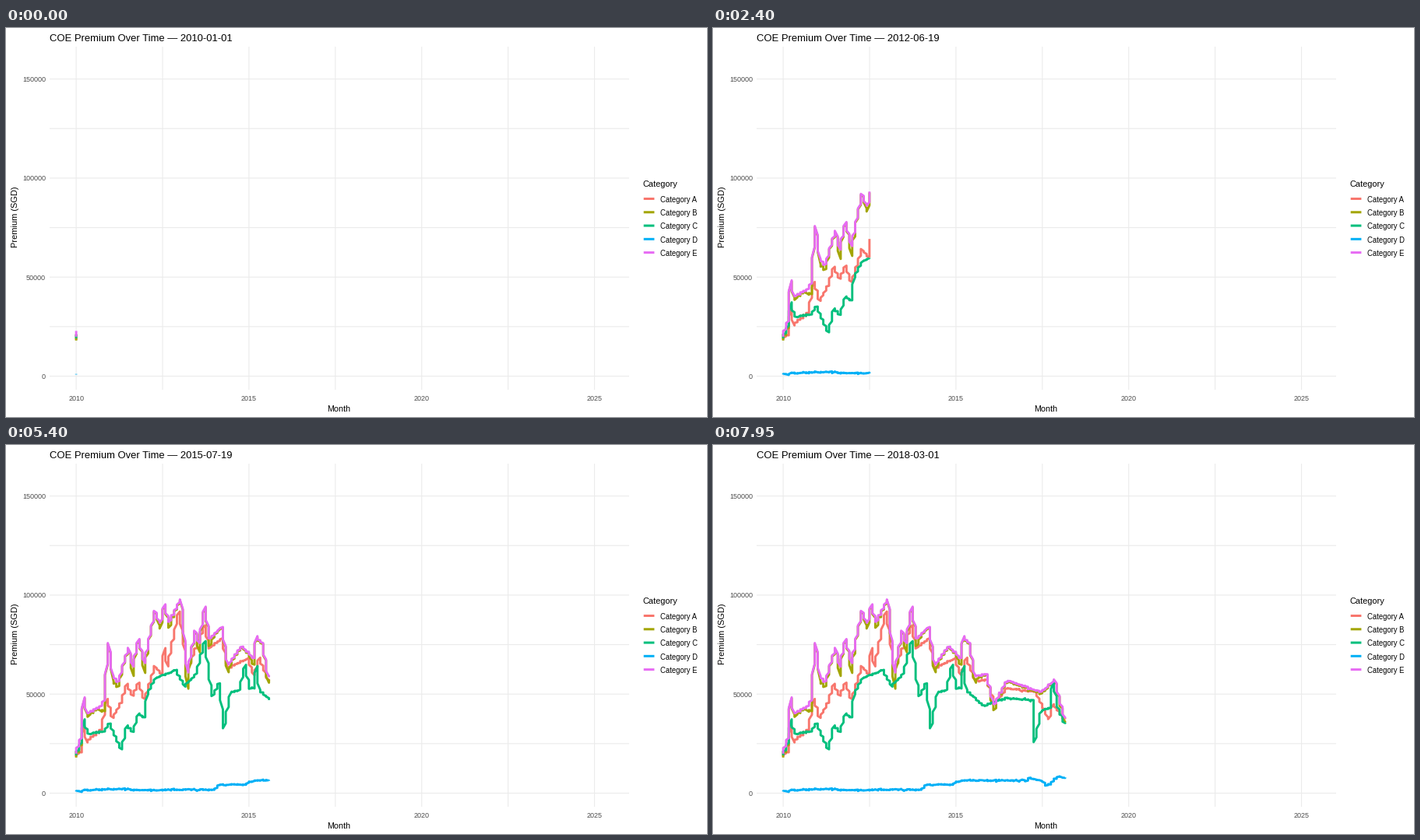
Write a matplotlib script that moves like this. It is 900 by 500 pixels and loops after 8000 ms.

```python
import numpy as np
import matplotlib.pyplot as plt
from matplotlib.animation import FuncAnimation

plt.rcParams["font.family"] = "Liberation Sans"

W, H = 900, 500
TICK = 50            # ms per drawn frame
HOLD = 3             # drawn frames per step of the date
LOOP = 8000
DAYS_PER_STEP = 56.25
START = np.datetime64("2010-01-01")
MONTHS = np.arange("2010-01", "2018-04", dtype="datetime64[M]")
MONTH_DAYS = (MONTHS.astype("datetime64[D]") - START).astype(int)
GRID = "#EBEBEB"
rng = np.random.default_rng(4)


def x_pos(day):
    return 90.1 + 0.12146 * np.asarray(day)


def y_pos(thousands):
    return 447.5 - 2.546 * np.asarray(thousands)


# Two bids share a month's x; the second lies most of the way to the next month
BID_X = x_pos(np.repeat(MONTH_DAYS, 2))
BID_MONTH = np.add.outer(np.arange(len(MONTHS)), [0, 0.7]).ravel()


def premium(turns):
    """Path through (month, thousands) turning points with slight roughness."""
    path = np.interp(BID_MONTH, *np.transpose(turns))
    return path + rng.normal(0, 0.25, path.size)


def deepen_dips(values, span=9):
    """Follow a series slightly below it, falling further in its valleys."""
    padded = np.pad(values, span // 2, mode="edge")
    mean = np.convolve(padded, np.ones(span) / span, "valid")
    return values - 0.5 - 0.6 * np.maximum(mean - values, 0)


cat_a = premium([
    (0, 18.5), (2, 21), (3, 34), (4, 26), (9, 32), (11, 47.5), (13, 38),
    (16, 46), (18, 55), (20, 49), (22, 56), (24, 47), (27.7, 64), (30, 60),
    (31, 73), (32, 64), (36, 92), (39, 62), (45, 85), (46.5, 73), (51, 78),
    (53, 63), (60, 68), (62, 59), (64, 68), (67, 57), (71, 57), (74, 45),
    (78, 53), (88, 51), (92.7, 37), (94, 45), (98, 37.5)])
cat_c = premium([
    (0, 19), (2, 25), (3, 37), (4.5, 30), (10, 31), (12, 35), (16, 22),
    (18, 34), (20, 31), (22, 40), (24, 38), (25, 50), (28, 58), (35, 62),
    (38, 54), (42, 60), (45, 77), (47.5, 48), (50, 56), (51.7, 33),
    (54, 51), (57, 52), (59, 65), (60.5, 53), (62, 53), (63, 64), (64, 52),
    (70, 44), (78, 48), (87, 47), (87.7, 26), (90, 42), (93, 43), (94, 57),
    (96, 42), (98, 35.5)])
cat_d = premium([
    (0, 0.9), (3, 1.4), (15, 2.2), (20, 1.7), (48, 1.7), (50, 4.2),
    (59, 4.3), (63, 6.5), (85, 6.4), (86, 7.7), (91, 5.6), (91.7, 3.5),
    (96, 8.2), (98, 8)])
cat_e = premium([
    (0, 20), (2, 28), (3, 48.5), (4, 40), (9, 44), (10, 47), (11.6, 77),
    (13, 59), (15, 56), (18.6, 74), (20, 64), (22, 78), (24, 66),
    (27.7, 92), (29.5, 85), (31, 95), (32.5, 86), (36.7, 98), (39, 61),
    (41.7, 82), (43, 76), (45, 94), (46.7, 78), (51, 84), (53, 65),
    (58, 74), (62, 68), (63, 79), (65, 76), (67, 59), (71, 60), (73.5, 44),
    (78, 57), (90, 51), (94.7, 57), (98, 38)])

SERIES = [("A", "#F8766D", cat_a), ("B", "#A3A500", deepen_dips(cat_e)),
          ("C", "#00BF7D", cat_c), ("D", "#00B0F6", cat_d),
          ("E", "#E76BF3", cat_e)]

fig = plt.figure(figsize=(W / 72, H / 72), dpi=72, facecolor="white")
ax = fig.add_axes([0, 0, 1, 1])
ax.set(xlim=(0, W), ylim=(H, 0))
ax.axis("off")


def label(x, y, text, size, color="black", ha="left", **kw):
    return ax.text(x, y, text, fontsize=size, color=color, ha=ha,
                   va=kw.pop("va", "baseline"), **kw)


def stroke(x, y, color, width, **kw):
    return ax.plot(x, y, color=color, lw=width, snap=False,
                   solid_capstyle="butt", solid_joinstyle="round", **kw)[0]


for k in range(0, 151, 25):
    y = y_pos(k)
    stroke([56, 800], [y, y], GRID, 1.1, zorder=1)
    if k % 50 == 0:
        label(51, y + 3.6, str(k * 1000), 9, "#4D4D4D", "right")

for half_years in range(0, 31, 5):
    x = x_pos(half_years * 365.25 / 2)
    stroke([x, x], [24, 465], GRID, 1.1, zorder=1)
    if half_years % 10 == 0:
        label(x, 479, str(2010 + half_years // 2), 9, "#4D4D4D", "center")

label(427.3, 493, "Month", 10.8, ha="center")
label(12, 242.5, "Premium (SGD)", 11, ha="center", va="center", rotation=90)
label(817, 204, "Category", 11)

lines = []
for row, (name, color, _) in enumerate(SERIES):
    y = 219.5 + 17.28 * row
    stroke([818.7, 832.4], [y, y], color, 3)
    label(840, y + 4.3, "Category " + name, 9.5)
    lines.append(stroke([], [], color, 2.9, zorder=3 + row))

title = label(56, 17, "", 12.95)


def update(frame):
    day = int(frame // HOLD * DAYS_PER_STEP)
    shown = 2 * (np.searchsorted(MONTH_DAYS, day) + 1)
    title.set_text(f"COE Premium Over Time \u2014 {START + day}")
    for line, (_, _, values) in zip(lines, SERIES):
        line.set_data(BID_X[:shown], y_pos(values[:shown]))
    return [title, *lines]


anim = FuncAnimation(fig, update, frames=LOOP // TICK, interval=TICK,
                     repeat=True, repeat_delay=0, blit=False)
plt.show()
```
